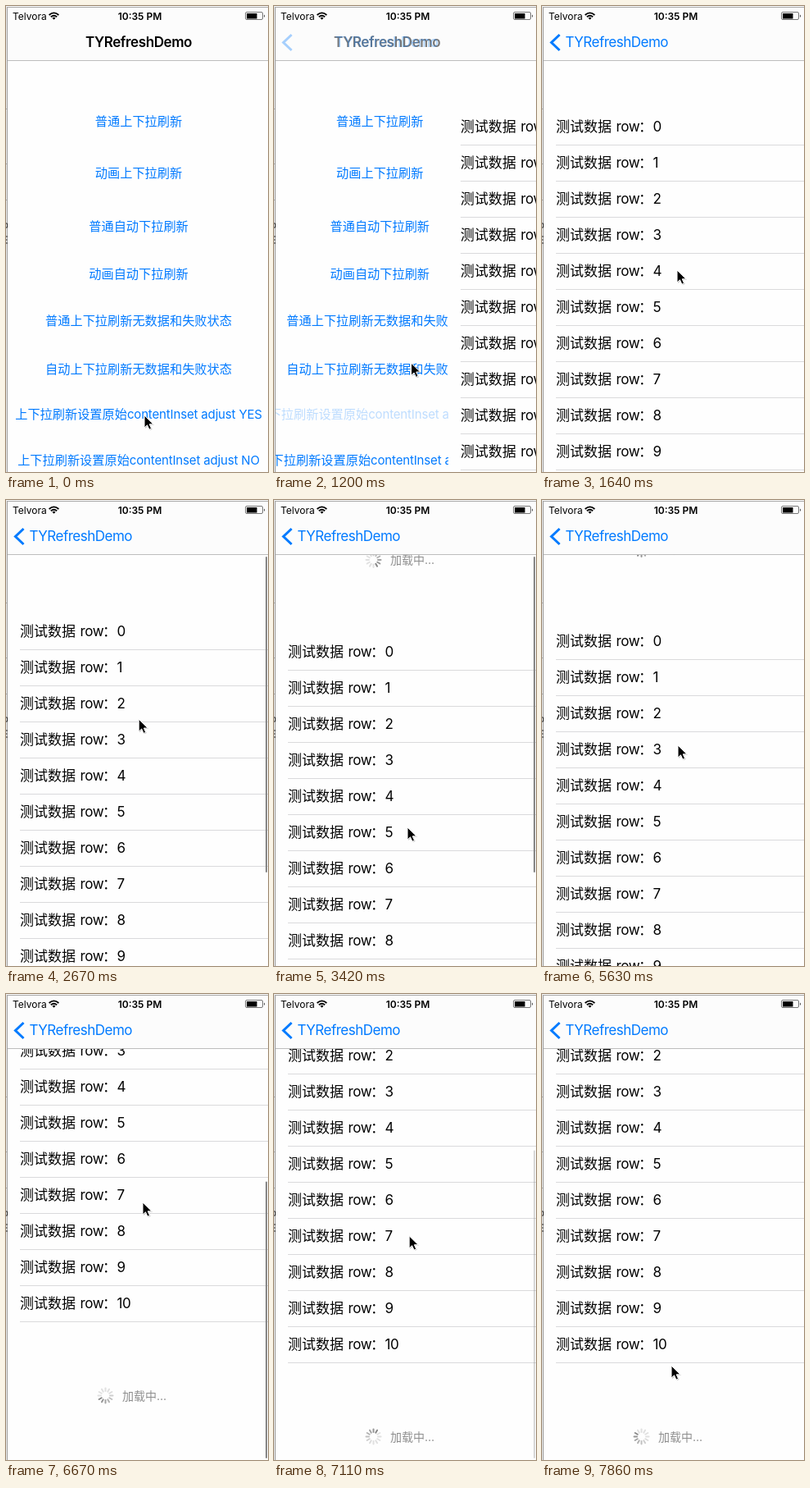
An HTML page that plays this animation: 320 px wide and 568 px high, repeating every 8000 ms.

```html
<!DOCTYPE html>
<html lang="zh-CN">
<head>
<meta charset="utf-8">
<title>Pull to refresh</title>
<style>
html, body { margin: 0; width: 100%; height: 100%; overflow: hidden; background: #fefefe; }
svg { display: block; width: 320px; height: 568px; }
text { font-family: Inter, "Noto Sans CJK SC", "Noto Sans CJK", sans-serif; font-size: 17px; }
.blue { fill: #007aff; }
.menu text { font-size: 15.2px; text-anchor: middle; }
.menu tspan { font-size: 15px; letter-spacing: -.15px; }
.latin { letter-spacing: -.4px; }
.load text { font-size: 14px; fill: #8e8e8e; }
.small { font-size: 12px; }
</style>
</head>
<body>
<svg viewBox="0 0 320 568">
  <clipPath id="screen"><path d="M2 2H320V568H2Z"/></clipPath>
  <rect width="320" height="568" fill="#fefefe"/>

  <g clip-path="url(#screen)">
    <g id="menu" class="menu blue"></g>
    <g id="page">
      <rect x="2" y="66" width="318" height="502" fill="#fefefe"/>
      <g id="list">
        <rect id="mark" x="2" y="301" width="318" height="44" fill="#d9d9d9"/>
        <g class="load" transform="translate(0 35)"></g>
        <g id="rows"></g>
        <g class="load" transform="translate(0 699.5)"></g>
      </g>
      <rect id="bar" x="317" width="2" rx="1" fill="#858585"/>
    </g>

    <rect x="2" y="2" width="318" height="64" fill="#fcfcfc"/>
    <path d="M2 66.5H320" stroke="#bdbdbd"/>
    <text id="title" x="162" y="50" text-anchor="middle" font-weight="600" class="latin">TYRefreshDemo</text>
    <g id="back">
      <path d="M21.5 35L11.5 44.5L21.5 54" fill="none" stroke="#007aff" stroke-width="3"/>
      <text id="backText" x="28.5" y="50" class="blue" letter-spacing="-.5">TYRefreshDemo</text>
    </g>

    <text x="8" y="17" class="small">Telvora</text>
    <path d="M52.6 11Q58.5 5.8 64.4 11M54.8 13.3Q58.5 10.1 62.2 13.3" fill="none" stroke="#000" stroke-width="1.8"/>
    <path d="M56.5 14.6Q58.5 13 60.5 14.6L58.5 16.8Z"/>
    <text x="163.5" y="17" class="small" font-weight="600" text-anchor="middle">10:35 PM</text>
    <rect x="292.5" y="7.5" width="21" height="9" rx="1.5" fill="none" stroke="#777"/>
    <rect x="294" y="9" width="12.5" height="6.5"/>
    <path d="M315 10.5q2 1.7 0 3.5z" fill="#333"/>
  </g>

  <path d="M1 1.5H320" stroke="#a8a8a8"/>
  <path d="M.5 0V568" stroke="#ededed"/>
  <path d="M1.5 1V568" stroke="#a0a0a0"/>
  <path d="M0 125.5H1M0 192.5H1M0 236.5H1" stroke="#aaa"/>
  <path d="M0 265H1.5V270H0M0 281H2M0 285H1.5M0 289H2" stroke="#222" fill="none"/>

  <g id="cursor">
    <path d="M1 1V16L4.6 12.7L7 18L9.6 16.9L7.3 11.7H12Z" opacity=".22"/>
    <path d="M0 0V15L3.5 11.8L5.9 17.2L8.5 16L6.2 10.8H11Z" stroke="#fff"/>
  </g>
</svg>

<script>
const $ = id => document.getElementById(id);
const LOOP = 8000, HOLD = 900, STEP = 148.1;
const PULL = 2530, DROP = 3300, LOADED = 5520, SWIPE = 6085, LET_GO = 6690;
const REST = 39, END = -160, ROW = 44;

const ramp = (t, a, b) => Math.min(1, Math.max(0, (t - a) / (b - a)));
const ease = (t, a, b) => { const p = ramp(t, a, b); return p * p * (3 - 2 * p); };
const settle = dt => Math.exp(-dt / 40) * Math.cos(dt / 55);
const rubber = d => d * 504 / (d + 504 / .55);

// Pointer legs: start, end, x, y; it rests in between
const legs = [
  [900, 1630, 165, 322], [1640, 2380, 162, 242], [PULL, 3110, 163, 399],
  [3720, 4500, 165, 360], [4620, 5180, 166, 277], [5200, 5630, 166, 299],
  [5640, 6080, 166, 464], [SWIPE, 6660, 167, 254], [6820, 7850, 158, 453]
];

function pointer(t) {
  let x = 169, y = 499;
  for (const [a, b, toX, toY] of legs) {
    const p = ease(t, a, b);
    x += (toX - x) * p;
    y += (toY - y) * p;
  }
  return [x, y];
}

// The list follows the pointer while dragged and springs back on release
function offset(t) {
  const y = pointer(t)[1];
  if (t < PULL) return 0;
  if (t < DROP) return rubber(y - 242);
  if (t < LOADED) return REST + (rubber(157) - REST) * settle(t - DROP);
  if (t < SWIPE) return REST * (1 - ease(t, LOADED, LOADED + 300));
  if (t < LET_GO) return y - 464;
  return END - 50 * settle(t - LET_GO);
}

const inset = '上下拉刷新设置原始<tspan>contentInset adjust ';
const items = [
  [141, '普通上下拉刷新'], [204, '动画上下拉刷新'], [269, '普通自动下拉刷新'],
  [327, '动画自动下拉刷新'], [384, '普通上下拉刷新无数据和失败状态'],
  [443, '自动上下拉刷新无数据和失败状态'],
  [498, inset + 'YES</tspan>'], [554, inset + 'NO</tspan>']
];
$('menu').innerHTML = items.map(([y, s]) => `<text x="162" y="${y + 5.2}">${s}</text>`).join('');
const tapped = $('menu').children[6];

const repeat = (n, make) => Array.from({ length: n }, (_, i) => make(i)).join('');

$('rows').innerHTML = repeat(11, i => {
  const y = 125 + ROW * i;
  return `<text y="${y + 28.4}"><tspan x="17">测试数据</tspan><tspan x="90.5" class="latin">row</tspan>` +
    `<tspan x="118">：</tspan><tspan x="135.5" class="latin">${i}</tspan></text>` +
    `<path d="M17 ${y + ROW + .5}H320" stroke="#dadadc"/>`;
});

for (const load of document.querySelectorAll('.load')) {
  load.innerHTML = '<text x="142" y="5">加载中...</text>' + repeat(12, i =>
    `<path d="M0 -5.5V-9" stroke="#888" stroke-width="2" stroke-linecap="round" transform="translate(121.5 0) rotate(${30 * i})"/>`);
}
const spokes = [...document.querySelectorAll('.load path')];

const move = (node, x, y) => node.setAttribute('transform', `translate(${x} ${y})`);
const fade = (node, v) => node.setAttribute('opacity', v);

function spin(t) {
  const head = Math.floor(t / 83.3);
  spokes.forEach((spoke, i) => {
    const age = (head + 12 - i % 12) % 12;
    fade(spoke, Math.max(.25, 1 - age * .12));
  });
}

function draw(t) {
  const off = Math.round(offset(t));
  const push = 1 - (1 - ramp(t, 1130, 1640)) ** 3;
  move($('cursor'), ...pointer(t));
  move($('list'), 0, off);
  fade($('mark'), t > 4590 && t < LOADED ? 1 : 0);
  spin(Math.max(t, DROP));

  move($('menu'), -96 * push, 0);
  move($('page'), 320 * (1 - push), 0);
  fade(tapped, t >= HOLD ? .25 : 1);
  move($('title'), -70 * push, 0);
  fade($('title'), Math.max(0, 1 - push * 1.4));
  move($('backText'), 70 * (1 - push), 0);
  fade($('back'), push);

  const up = Math.max(0, -off), top = 69 + up * .76;
  $('bar').setAttribute('y', top);
  $('bar').setAttribute('height', Math.min(566, 454 + up * .7) - top);
  fade($('bar'), ramp(t, PULL, 2670) - ramp(t, 3440, 3720) + ramp(t, SWIPE, 6230) - ramp(t, 6820, 7260));
}

// The picture advances in short holds, as a screen recording does
function tick() {
  const t = performance.now() % LOOP;
  draw(t < HOLD - 8 ? 0 : HOLD + Math.floor((t - HOLD + 16) / STEP) * STEP);
  requestAnimationFrame(tick);
}
tick();
</script>
</body>
</html>
```
